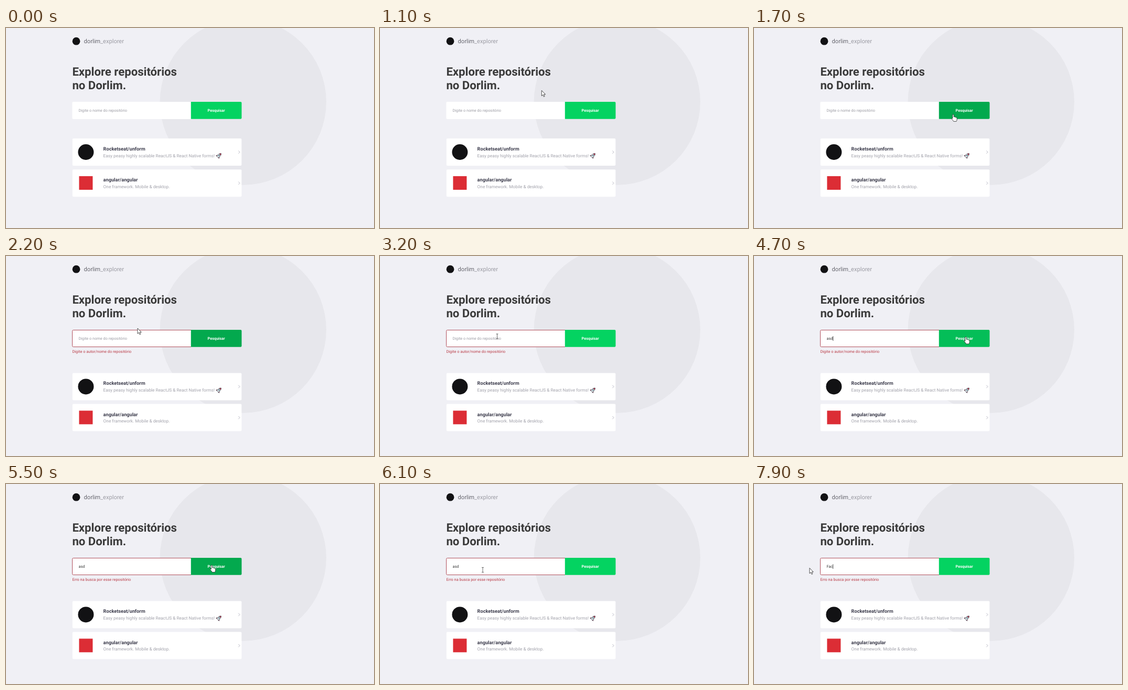
Animation of 702 by 382 pixels, one loop 8 s. Source, as an HTML page:

```html
<!DOCTYPE html>
<html lang="pt-BR">
<head>
<meta charset="utf-8">
<title>Explorador de repositórios</title>
<style>
  html, body { margin: 0; width: 100%; height: 100%; overflow: hidden; background: #f0f0f5; }
  svg { display: block; }
  text { font-family: Roboto, Arial, sans-serif; font-size: 7.37px; fill: #9c9ca4; text-rendering: geometricPrecision; }
  .brand { font-size: 11.1px; }
  .brand tspan { fill: #66666e; }
  .title { font-size: 22.15px; font-weight: 700; fill: #3a3a3a; }
  .name { font-size: 9.2px; font-weight: 700; fill: #3d3d4d; }
  .info { font-size: 8.3px; fill: #a2a2ab; }
  .button { font-weight: 700; fill: #fff; text-anchor: middle; }
  #error { fill: #b93a45; }
  #border { fill: none; stroke: #b0505c; }
  .card { fill: #fff; }
  .chevron { fill: none; stroke: #b8b8c4; }
</style>
</head>
<body>
<svg width="702" height="382" viewBox="0 0 702 382">
  <circle cx="452.3" cy="141" r="158.7" fill="#e7e7ec"/>

  <circle cx="134" cy="25.2" r="7.4" fill="#121214"/>
  <text class="brand" x="148.6" y="28.8"><tspan>dorlim</tspan>_explorer</text>
  <text class="title" x="126.4" y="91.3">Explore repositórios</text>
  <text class="title" x="126.4" y="117">no Dorlim.</text>

  <rect class="card" x="126.4" y="141" width="230" height="33" rx="2"/>
  <path id="border" d="M353 141.5H128.5q-2 0-2 2V171.5q0 2 2 2H353"/>
  <rect id="mark" x="138.4" y="153" width="12.4" height="9.2" fill="#3390ff"/>
  <text id="field" x="138.4" y="160.2"></text>
  <rect id="caret" y="153.2" width=".8" height="8.8" fill="#222"/>
  <path id="button" d="M352.8 141H447.5q2 0 2 2V171.7q0 2-2 2H352.8z"/>
  <text class="button" x="401.1" y="159.5">Pesquisar</text>
  <text id="error" x="126.5" y="184.5"></text>

  <g id="list">
    <rect class="card" x="126.8" y="211" width="322.6" height="52" rx="2"/>
    <circle cx="152.4" cy="237" r="15" fill="#121214"/>
    <text class="name" x="185.6" y="234">Rocketseat/unform</text>
    <text class="info" x="185.6" y="247">Easy peasy highly scalable ReactJS &amp; React Native forms!</text>
    <g transform="translate(406 244) rotate(45)" stroke="#2b3440" stroke-width=".6">
      <path d="M-2 0L-4 3.5L-1.6 3zM2 0L4 3.5L1.6 3z" fill="#d9364f"/>
      <path d="M0-6Q4-1.5 1.8 3.6H-1.8Q-4-1.5 0-6z" fill="#dfe7ea"/>
      <path d="M0-6Q1.6-4.5 2-3H-2Q-1.6-4.5 0-6z" fill="#d9364f"/>
      <circle cy="-.6" r=".9" fill="#3b9bb0"/>
    </g>
    <path class="chevron" d="M443.4 234.4l2.6 2.7l-2.6 2.7"/>

    <rect class="card" x="126.8" y="270.2" width="322.6" height="52" rx="2"/>
    <rect x="139.4" y="283" width="26" height="26" fill="#dc2d35"/>
    <text class="name" x="185.6" y="293.4">angular/angular</text>
    <text class="info" x="185.6" y="305.5">One framework. Mobile &amp; desktop.</text>
    <path class="chevron" d="M443.4 293.6l2.6 2.7l-2.6 2.7"/>
  </g>

  <g id="pointer" fill="#fff" stroke="#222" stroke-width=".8" stroke-linejoin="round">
    <path id="arrow" d="M0 0V10.4L2.4 8.2L4.1 12L5.8 11.2L4.2 7.5H7.3z"/>
    <path id="beam" d="M-2-4.6H2M0-4.6V4.6M-2 4.6H2" stroke="#444"/>
    <path id="hand" d="M-1.2 8V1Q-1.2 0 0 0T1.2 1V4.8Q2.8 4 3.4 5.3Q5 4.7 5.4 6Q7.2 5.5 7.2 7.2V10Q7.2 11.4 6 13.4H.8Q.2 12-2.8 8.8Q-3.4 7.6-2.2 7.2Q-1.6 7.2-1.2 8z"/>
  </g>
</svg>
<script>
const LOOP = 8000, STEP = 100, BLINK = 500;
const SUBMIT = 1800, TYPE = 3300, FAIL = 5400, SELECT = 6600, RETYPE = 7500;

const $ = id => document.getElementById(id);
const show = (id, on) => $(id).setAttribute('visibility', on ? 'visible' : 'hidden');
const between = (t, from, to) => t >= from && t < to;
const ease = p => p * p * (3 - 2 * p);

// Each stroke of the mouse glides from the last resting point to the next
const moves = [
  { at: 1000, time: 500, x: 380, y: 165 },
  { at: 2100, time: 100, x: 251, y: 138 },
  { at: 2300, time: 500, x: 223.5, y: 153.5 },
  { at: 4200, time: 500, x: 404, y: 154.5 },
  { at: FAIL, time: 700, x: 196, y: 164 },
  { at: 6400, time: 300, x: 106, y: 160.5 }
];

function mouse(t) {
  let x = 300, y = 114;
  for (const m of moves) {
    const p = ease(Math.min(1, Math.max(0, (t - m.at) / m.time)));
    x += (m.x - x) * p;
    y += (m.y - y) * p;
  }
  const inside = between(x, 127, 449) && between(y, 141, 174);
  return { x, y, kind: !inside ? 'arrow' : x < 353 ? 'beam' : 'hand' };
}

// The button fades over two steps, trailing the mouse
const over = t => mouse(t).kind === 'hand' ? 1 : 0;
const hover = t => (over(t - STEP) + over(t - 2 * STEP)) / 2;

const typing = (text, t, gap) => text.slice(0, Math.max(0, Math.floor(t / gap) + 1));

function draw(t) {
  const word = t < RETYPE ? typing('asd', t - TYPE, 100) : typing('Fac', t - RETYPE, 200);
  const selected = between(t, SELECT, RETYPE);
  const field = $('field');
  field.textContent = word || 'Digite o nome do repositório';
  field.style.fill = selected ? '#fff' : word ? '#3a3a3a' : '';
  show('mark', selected);

  const focused = t < 1500 || between(t, TYPE, 5000) || t >= RETYPE;
  $('caret').setAttribute('x', 138.5 + (word ? field.getComputedTextLength() : 0));
  show('caret', focused && Math.floor((t - STEP) / BLINK) % 2 === 1);

  const invalid = t >= SUBMIT;
  $('error').textContent = !invalid ? '' :
    t < FAIL ? 'Digite o autor/nome do repositório' : 'Erro na busca por esse repositório';
  show('border', invalid);
  $('list').setAttribute('transform', `translate(0 ${invalid ? 12.4 : 0})`);

  const h = hover(t);
  $('button').setAttribute('fill', `rgb(${4 - h} ${211 - 42 * h} ${97 - 19 * h})`);

  const { x, y, kind } = mouse(t);
  const visible = between(t, 1000, TYPE) || t >= 4100;
  $('pointer').setAttribute('transform', `translate(${x} ${y})`);
  for (const id of ['arrow', 'beam', 'hand']) show(id, visible && id === kind);
}

function tick() {
  const t = performance.now() % LOOP;
  draw(Math.floor(t / STEP) * STEP);
  requestAnimationFrame(tick);
}
tick();
</script>
</body>
</html>
```
